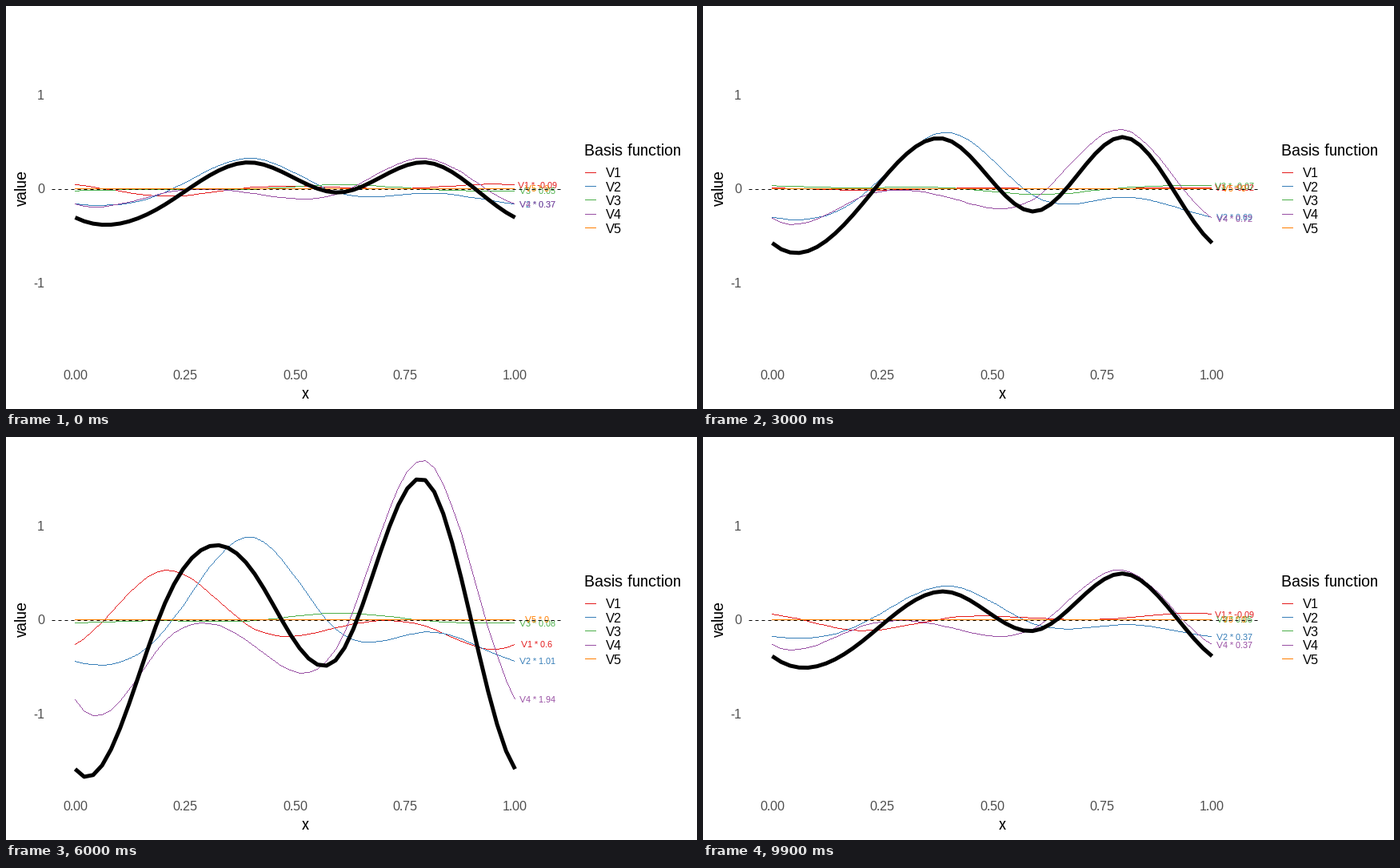
A matplotlib script for the animation above (10000 ms loop, 864 by 504 pixels).

```python
import numpy as np
import matplotlib.pyplot as plt
from matplotlib.animation import FuncAnimation
from matplotlib.patches import PathPatch
from matplotlib.path import Path

plt.rcParams["font.family"] = "Liberation Sans"
plt.rcParams["text.hinting"] = "native"
plt.rcParams["text.hinting_factor"] = 1

W, H, DPI = 864, 504, 72          # at 72 dpi one point is one pixel
X0, XSCALE = 86.5, 550
Y0, YSCALE = 228.5, 117.5
N = 50
STEP, HOLD, TWEEN = 10, 5, 5      # frames per state, held, moving

COLORS = ["#E41A1C", "#377EB8", "#4DAF4A", "#984EA3", "#FF7F00"]

# Weights of the basis functions V1..V4 in each state (V5 is always zero)
WEIGHTS = np.array([
    [-0.09, 0.37, 0.05, 0.37],
    [0.10, 0.18, 0.13, 0.34],
    [-0.05, 0.19, 0.13, 0.09],
    [-0.02, 0.69, -0.07, 0.72],
    [0.12, -0.20, 0.10, -0.15],
    [-0.06, -0.03, -0.13, -0.31],
    [0.60, 1.01, 0.08, 1.94],
    [0.20, 0.36, -0.05, 0.55],
    [-0.13, 0.68, -0.25, -0.01],
    [-0.30, 0.58, -0.20, 1.55],
])
WEIGHTS = np.column_stack([WEIGHTS, np.zeros(len(WEIGHTS))])


def cyclic_spline(values, x):
    """Periodic cubic spline through equally spaced knots on [0, 1]."""
    n = len(values)
    h = 1 / n
    eye = np.eye(n)
    ring = np.roll(eye, 1, axis=0) + np.roll(eye, -1, axis=0)
    curve = np.linalg.solve(ring + 4 * eye, 6 * (ring - 2 * eye) @ values / h**2)
    i = np.minimum((x / h).astype(int), n - 1)
    j = (i + 1) % n
    b = x / h - i
    a = 1 - b
    bend = (a**3 - a) * curve[i] + (b**3 - b) * curve[j]
    return a * values[i] + b * values[j] + bend * h**2 / 6


def centred_basis(x):
    """Cyclic spline basis with a sum-to-zero constraint (Householder)."""
    n = 5
    sums = np.full(n, (N - 1) / n)
    sums[0] += 1
    u = sums.copy()
    u[0] += np.linalg.norm(sums)
    z = np.eye(n) - 2 * np.outer(u, u) / (u @ u)
    return np.array([cyclic_spline(z[:, k], x) for k in range(1, n)]
                    + [np.zeros_like(x)])


def to_y(v):
    return Y0 - YSCALE * v


SQUARE = np.array([[0, 0], [1, 0], [1, 1], [0, 1], [0, 0]])
SQUARE_CODES = [Path.MOVETO] + [Path.LINETO] * 3 + [Path.CLOSEPOLY]


def hairline(xs, ys):
    """Path of unit squares: a crisp polyline one pixel wide."""
    vx, vy = np.floor(xs), np.floor(ys)
    steps = np.maximum(abs(np.diff(vx)), abs(np.diff(vy)))
    s = np.concatenate([[0], np.cumsum(steps)])
    k = np.arange(s[-1])
    cells = np.rint(np.column_stack([np.interp(k, s, vx), np.interp(k, s, vy)]))
    verts = (cells[:, None] + SQUARE).reshape(-1, 2)
    return Path(verts, np.tile(SQUARE_CODES, len(cells)))


x = np.linspace(0, 1, N)
px = X0 + XSCALE * x
basis = centred_basis(x)

fig = plt.figure(figsize=(W / DPI, H / DPI), dpi=DPI, facecolor="white")
ax = fig.add_axes([0, 0, 1, 1])
ax.set_xlim(0, W)
ax.set_ylim(H, 0)
ax.axis("off")


def put(tx, ty, s, size, color="black", ha="left", **kw):
    return ax.text(tx, ty, s, fontsize=size, color=color, ha=ha,
                   va="baseline", **kw)


def thin(xs, ys, color):
    return ax.add_patch(PathPatch(hairline(xs, ys), fc=color, lw=0, zorder=2))


# Axes
GREY = "#4D4D4D"
for v in (0, 0.25, 0.5, 0.75, 1):
    put(X0 + XSCALE * v, 467, f"{v:.2f}", 16, GREY, "center")
for v in (1, 0, -1):
    put(48, to_y(v) + 6, str(v), 16, GREY, "right")
put(374.5, 491, "x", 20, ha="center")
put(26, 228, "value", 20, ha="center", rotation=90, rotation_mode="anchor")

# Legend
put(723, 187, "Basis function", 20)
for k, color in enumerate(COLORS):
    y = 208.3 + 17.3 * k
    thin([724, 738], [y, y], color)
    put(750, y + 6, f"V{k + 1}", 16)

# Moving parts
lines = [thin(px, np.full(N, Y0), c) for c in COLORS]
labels = [put(X0 + XSCALE * 1.05, 0, "", 11, c, "center", zorder=3)
          for c in COLORS]
ax.plot([57, 693], [Y0, Y0], color="black", lw=1, zorder=4,
        dashes=(4, 4), dash_capstyle="butt")
total, = ax.plot(px, px, color="black", lw=5, zorder=5,
                 solid_capstyle="butt", solid_joinstyle="round")


def update(frame):
    state, r = divmod(frame, STEP)
    t = max(0, (r - HOLD) / TWEEN)
    now, nxt = WEIGHTS[state], WEIGHTS[(state + 1) % len(WEIGHTS)]
    curves = ((1 - t) * now + t * nxt)[:, None] * basis
    shown = now if t < 0.5 else nxt
    for k, (line, label) in enumerate(zip(lines, labels)):
        y = to_y(curves[k])
        line.set_path(hairline(px, y))
        label.set_y(y[-1] + 4)
        label.set_text(f"V{k + 1} * {shown[k]:g}")
    total.set_ydata(to_y(curves.sum(axis=0)))
    return [*lines, *labels, total]


anim = FuncAnimation(fig, update, frames=STEP * len(WEIGHTS), interval=100,
                     init_func=lambda: update(0), repeat=True, repeat_delay=0)
plt.show()
```
